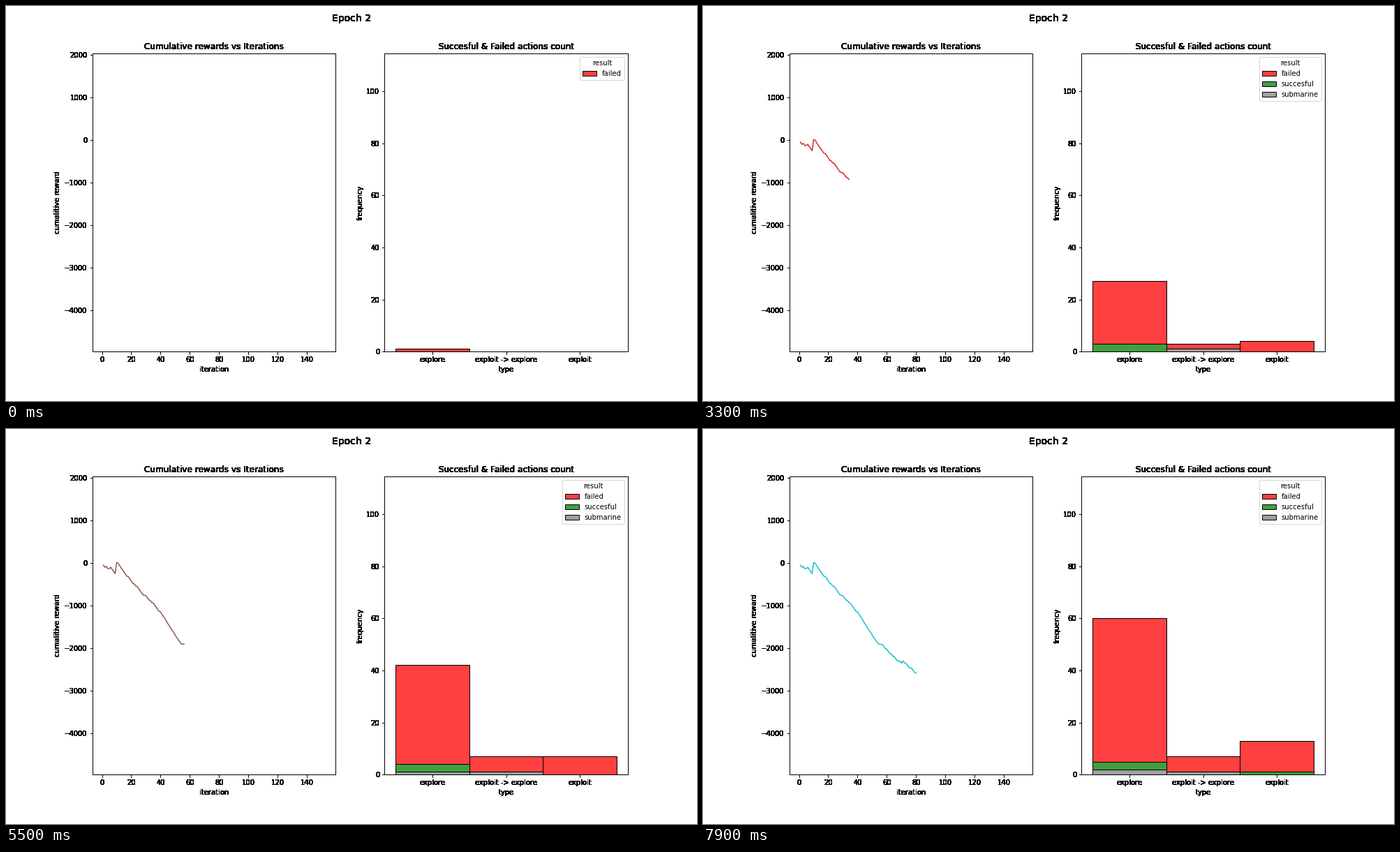
These frames come from a looping animation (990x566 px, 8000 ms). A matplotlib script:

```python
import numpy as np
import matplotlib.pyplot as plt
from matplotlib.animation import FuncAnimation
from matplotlib.colors import to_rgba
from matplotlib.patches import Patch

W, H, DPI = 990, 566, 72
STEPS = 80

KINDS = ["explore", "exploit -> explore", "exploit"]
COLORS = {"failed": "red", "succesful": "green", "submarine": "gray"}

# Which action type was taken and how it ended, per iteration (1-based).
SWITCH = {5, 12, 21, 41, 44, 47, 50}
EXPLOIT = {22, 29, 30, 33, 35, 40, 55, 60, 65, 68, 71, 76, 80}
SUBMARINE = {5, 56, 69}
GAINS = {3: 20, 6: 30, 10: 260, 71: 60}
ODD_COSTS = dict.fromkeys((11, 18, 24, 57, 63, 73, 77), -10) | {45: -60}
FAIL_COST = [-50, -60, -10]


def step(n):
    """Return (kind index, result, reward) of iteration n."""
    kind = 1 if n in SWITCH else 2 if n in EXPLOIT else 0
    if n in SUBMARINE:
        return kind, "submarine", 0
    if n in GAINS:
        return kind, "succesful", GAINS[n]
    return kind, "failed", ODD_COSTS.get(n, FAIL_COST[kind])


log = [step(n) for n in range(1, STEPS + 1)]
iters = np.arange(1, STEPS + 1)
total = np.cumsum([reward for _, _, reward in log])


def darken(img, dpi):
    """Look of the same text painted over itself many times."""
    img[..., :3] = 0
    img[..., 3] = 1 - (1 - img[..., 3]) ** 50
    return img, 0, 0


plt.rcParams["font.family"] = "DejaVu Sans"
plt.rcParams["font.size"] = 10
fig = plt.figure(figsize=(W / DPI, H / DPI + 1e-6), dpi=DPI, facecolor="white")
fig.subplots_adjust(left=0.125, right=0.9, top=0.88, bottom=70.8 / H, wspace=0.2)
left, right = fig.subplots(1, 2)
fig.suptitle("Epoch 2", fontsize=14).set_agg_filter(darken)


def setup(ax, title, xlabel, ylabel, xlim, ylim):
    ax.set_title(title, fontsize=12).set_agg_filter(darken)
    ax.set(xlabel=xlabel, ylabel=ylabel, xlim=xlim, ylim=ylim)
    for axis in (ax.xaxis, ax.yaxis):
        axis.set_agg_filter(darken)
    for spine in ax.spines.values():
        spine.set_linewidth(1)


setup(left, "Cumulative rewards vs Iterations", "iteration", "cumalitive reward",
      (-6.55, 159.55), (-4979, 2039))
left.set_xticks(range(0, 141, 20))
left.set_yticks(range(-4000, 2001, 1000))

setup(right, "Succesful & Failed actions count", "type", "frequency",
      (-0.65, 2.65), (0, 114.45))
right.set_xticks(range(3), KINDS)
right.set_yticks(range(0, 101, 20))

line, = left.plot([], [], lw=1.5)
style = {name: dict(facecolor=to_rgba(color, 0.75), edgecolor="black", linewidth=1)
         for name, color in COLORS.items()}
stack = list(COLORS)[::-1]
bars = {name: right.bar(range(3), [0] * 3, width=1, **style[name]) for name in stack}


def update(i):
    n = i + 1
    line.set_data(iters[:n], total[:n])
    line.set_color(f"C{i % 10}")

    base = np.zeros(3)
    seen = {result for _, result, _ in log[:n]}
    for name in stack:
        kinds = [kind for kind, result, _ in log[:n] if result == name]
        count = np.bincount(np.array(kinds, dtype=int), minlength=3)
        for bar, y, h in zip(bars[name], base, count):
            bar.set_y(y)
            bar.set_height(h)
            bar.set_visible(name in seen)
        base = base + count

    right.legend(handles=[Patch(label=name, **style[name])
                          for name in COLORS if name in seen],
                 title="result", loc="upper right")


anim = FuncAnimation(fig, update, frames=STEPS, interval=100, repeat=True)
plt.show()
```
